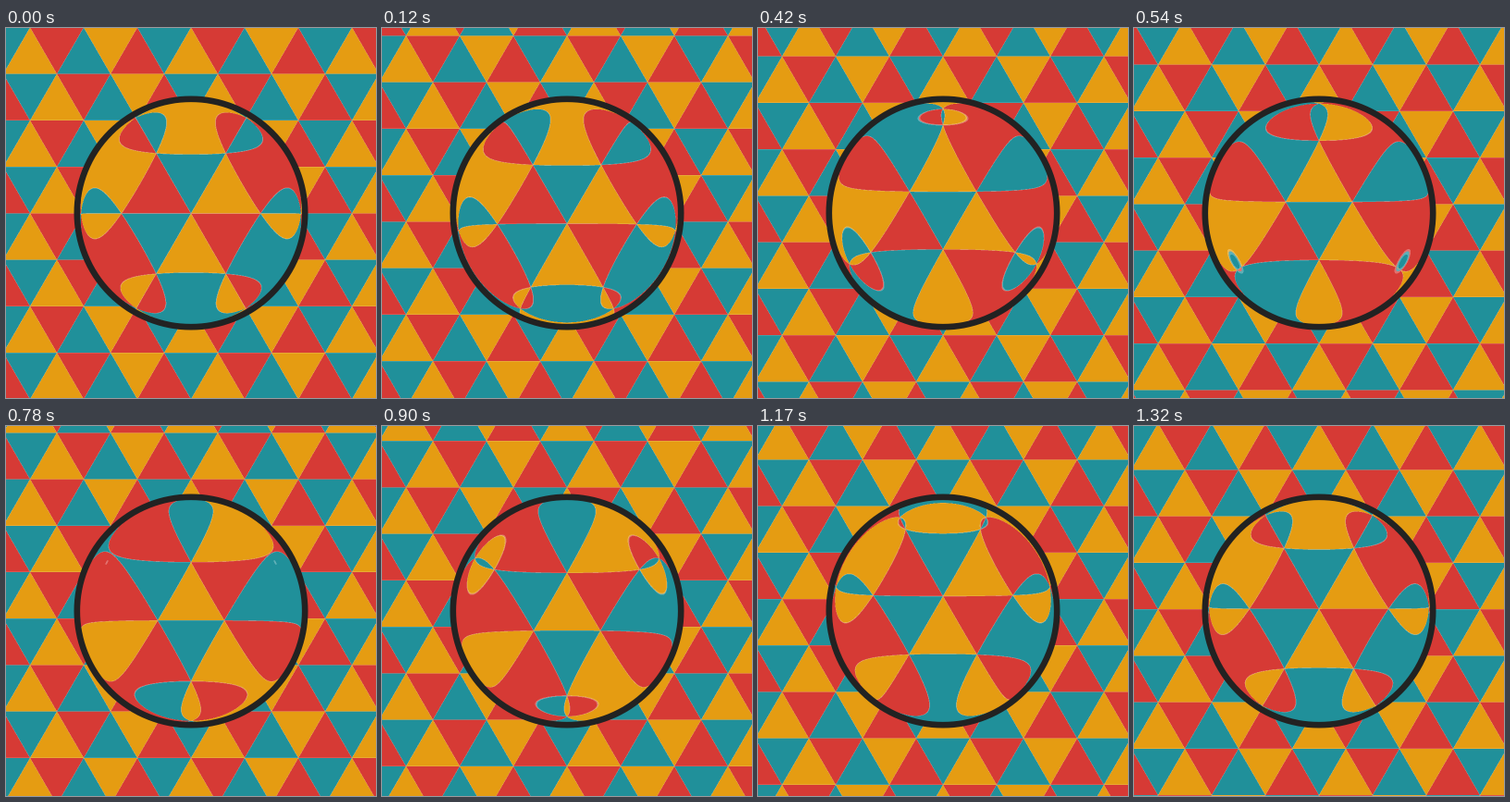
An HTML page with a canvas for the animation above (1350 ms loop, 400 px wide and 400 px high).

```html
<!DOCTYPE html>
<html lang="en">
<head>
<meta charset="utf-8">
<title>Glass ball over scrolling triangles</title>
<style>
  html, body { margin: 0; width: 100%; height: 100%; overflow: hidden; }
  canvas { display: block; width: 400px; height: 400px; }
</style>
</head>
<body>
<canvas width="800" height="800"></canvas>
<script>
const LOOP = 1350, STEP = 30;
const SIZE = 800, SCALE = 2, CENTER = 200;
const SIDE = 58, ROW = SIDE * Math.sqrt(3) / 2;
const LENS = 123, INDEX = 1.1, DEPTH = 251;
const SEAM = 0.25 / ROW;

const ctx = document.querySelector('canvas').getContext('2d');
const image = ctx.createImageData(SIZE, SIZE);
const pixels = new Uint32Array(image.data.buffer);

const pack = ([r, g, b]) => (255 << 24 | b << 16 | g << 8 | r) >>> 0;
const lighten = rgb => rgb.map(c => Math.round(c + (255 - c) * 0.28));
const colors = [[229, 156, 18], [214, 58, 53], [32, 144, 154]];
const fills = colors.map(pack);
const seams = colors.map(c => pack(lighten(c)));

// Radius on the plane seen through radius r of the ball (Snell's law)
function refract(r) {
  const s = r / LENS;
  return r - DEPTH * Math.tan(Math.asin(s) - Math.asin(s / INDEX));
}

// Lattice coordinates of every sample; only the vertical one scrolls
const across = new Float32Array(SIZE * SIZE);
const down = new Float32Array(SIZE * SIZE);
for (let i = 0; i < pixels.length; i++) {
  const x = (i % SIZE + 0.5) / SCALE - CENTER;
  const y = (Math.floor(i / SIZE) + 0.5) / SCALE - CENTER;
  const r = Math.hypot(x, y);
  const zoom = r < LENS ? refract(r) / r : 1;
  across[i] = x * zoom / SIDE;
  down[i] = y * zoom / ROW;
}

const nearLine = f => f < SEAM || f > 1 - SEAM;

function draw(time) {
  const shift = 2 * time / LOOP + 0.4 / ROW;
  for (let i = 0; i < pixels.length; i++) {
    const v = down[i] - shift;
    const p = across[i] - v / 2, q = across[i] + v / 2;
    const row = Math.floor(v), a = Math.floor(p), b = Math.floor(q);
    const hue = (a + b + 1 + 2 * (row & 1) + 300) % 3;
    const onSeam = nearLine(v - row) || nearLine(p - a) || nearLine(q - b);
    pixels[i] = (onSeam ? seams : fills)[hue];
  }
  ctx.putImageData(image, 0, 0);
  ctx.beginPath();
  ctx.arc(CENTER * SCALE, CENTER * SCALE, 123.2 * SCALE, 0, 2 * Math.PI);
  ctx.lineWidth = 6.6 * SCALE;
  ctx.strokeStyle = '#222';
  ctx.stroke();
}

const start = performance.now();
let shown = -1;
function tick() {
  const step = Math.floor((performance.now() - start) % LOOP / STEP);
  if (step !== shown) draw((shown = step) * STEP);
  requestAnimationFrame(tick);
}
tick();
</script>
</body>
</html>
```
